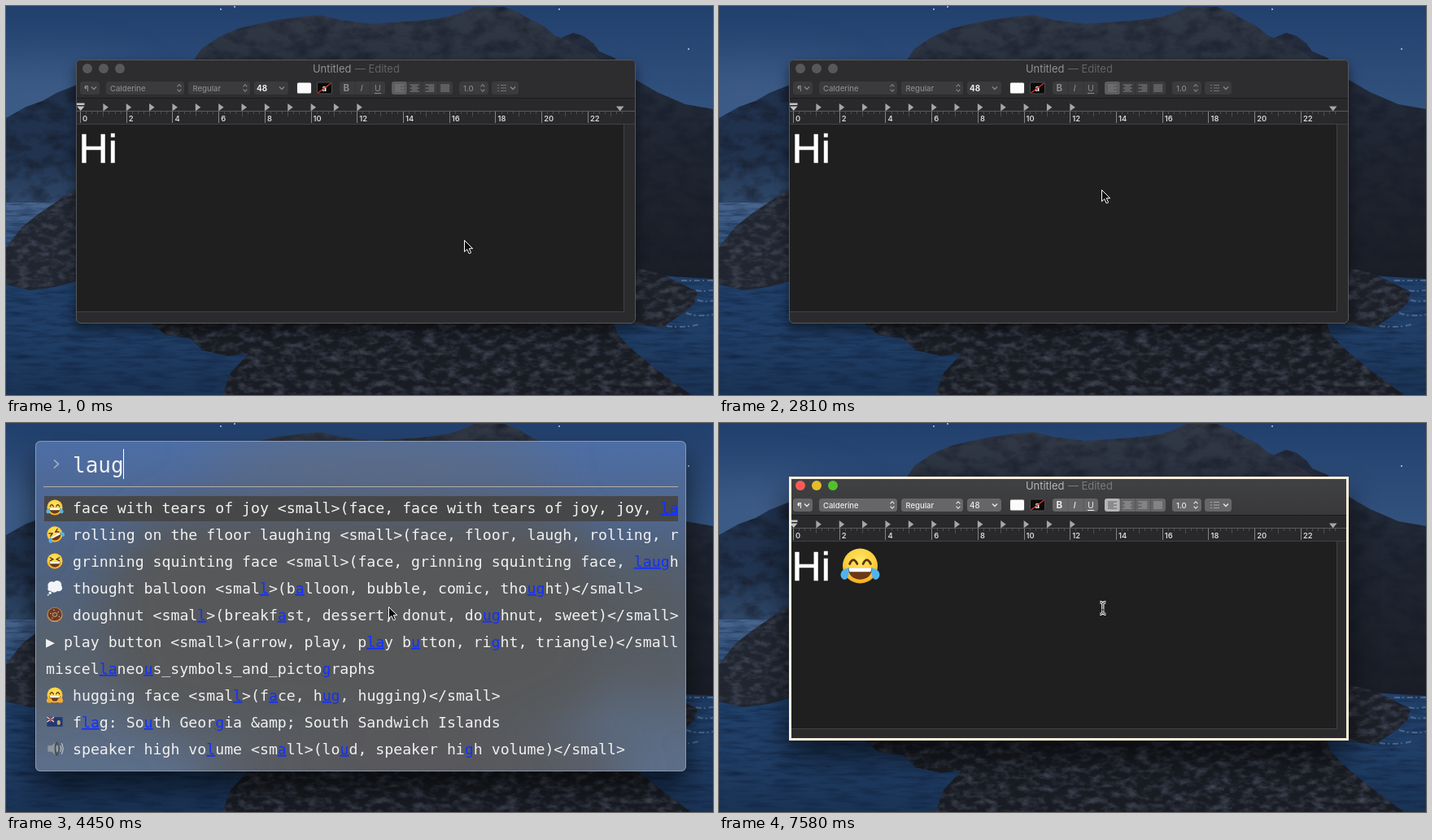
These frames come from a looping animation (869 px wide and 479 px high, 8 s). An HTML page:

```html
<!DOCTYPE html>
<html lang="en">
<head>
<meta charset="utf-8">
<title>Emoji picker</title>
<style>
  html, body { margin: 0; width: 100%; height: 100%; overflow: hidden; background: #1d355e; }
  svg { display: block; width: 869px; height: 479px; }
  text { font-family: Inter, Roboto, sans-serif; }
  .mono { font-family: "DejaVu Sans Mono", monospace; }
  .doc { font-family: "Liberation Sans", sans-serif; }
  .hit { fill: #1230ff; text-decoration: underline; }
</style>
</head>
<body>
<svg id="stage" viewBox="0 0 869 479" xmlns="http://www.w3.org/2000/svg"></svg>
<script>
const LOOP = 8000;
const stage = document.getElementById('stage');

// ---- small builders
const esc = s => s.replace(/&/g, '&amp;').replace(/</g, '&lt;');
const rect = (x, y, w, h, fill, more = '') =>
  `<rect x="${x}" y="${y}" width="${w}" height="${h}" fill="${fill}" ${more}/>`;
const path = (d, fill, more = '') => `<path d="${d}" fill="${fill}" ${more}/>`;
const line = (d, color, w = 1, more = '') =>
  `<path d="${d}" fill="none" stroke="${color}" stroke-width="${w}" ${more}/>`;
const oval = (x, y, rx, ry, fill, more = '') =>
  `<ellipse cx="${x}" cy="${y}" rx="${rx}" ry="${ry}" fill="${fill}" ${more}/>`;
const label = (x, y, s, size, fill, more = '') =>
  `<text x="${x}" y="${y}" font-size="${size}" fill="${fill}" ${more}>${esc(s)}</text>`;
const group = (body, more = '') => `<g ${more}>${body}</g>`;
const gradient = (id, stops) =>
  `<linearGradient id="${id}" x1="0" y1="0" x2="0" y2="1">` +
  stops.map(([o, c]) => `<stop offset="${o}" stop-color="${c}"/>`).join('') + '</linearGradient>';
const blur = (id, d) =>
  `<filter id="${id}" x="-50%" y="-80%" width="200%" height="260%"><feGaussianBlur stdDeviation="${d}"/></filter>`;
const grain = (id, freq, seed, rgb, gain, shift) =>
  `<filter id="${id}" x="0" y="0" width="1" height="1" color-interpolation-filters="sRGB">
    <feTurbulence type="fractalNoise" baseFrequency="${freq}" numOctaves="4" seed="${seed}"/>
    <feColorMatrix values="0 0 0 0 ${rgb[0]} 0 0 0 0 ${rgb[1]} 0 0 0 0 ${rgb[2]} ${gain} 0 0 0 ${shift}"/>
    <feComposite operator="in" in2="SourceAlpha" result="g"/>
    <feMerge><feMergeNode in="SourceGraphic"/><feMergeNode in="g"/></feMerge></filter>`;

const defs = `<defs>
  ${gradient('sky', [[0, '#22406d'], [.5, '#33537f'], [1, '#45638d']])}
  ${gradient('sea', [[0, '#4a678f'], [.2, '#35557f'], [.45, '#20406a'], [.7, '#203e66'], [1, '#1a3355']])}
  ${gradient('peak', [[0, '#333a47'], [1, '#232a38']])}
  ${gradient('hill', [[0, '#20314c'], [.6, '#20334f'], [1, '#2f4869']])}
  ${gradient('cliff', [[0, '#262f40'], [.5, '#1f2531'], [1, '#1b1e26']])}
  ${gradient('bar', [[0, '#414244'], [1, '#38383a']])}
  ${gradient('panel', [[0, '#4c6ea6'], [.14, '#4f6996'], [.4, '#4f627f'], [.7, '#596371'], [1, '#5c6f8b']])}
  <radialGradient id="skin" cy=".35" r=".7"><stop offset="0" stop-color="#ffe866"/>
    <stop offset=".6" stop-color="#fdcf3c"/><stop offset="1" stop-color="#f3a01f"/></radialGradient>
  ${blur('soft', 8)}${blur('wide', 18)}${blur('haze', 28)}
  ${grain('rock', '.07 .13', 4, [.31, .34, .41], 1.5, -.62)}
  ${grain('slope', '.04 .07', 9, [.09, .11, .16], 1.6, -.65)}
  ${grain('wave', '.03 .2', 6, [.07, .14, .25], 1.5, -.62)}
  <clipPath id="inside"><rect x="36" y="22" width="800" height="407" rx="6"/></clipPath>
  <clipPath id="rows"><rect x="46" y="85" width="780" height="340"/></clipPath>
</defs>`;

// ---- wallpaper
const wallpaper =
  rect(0, 0, 869, 260, 'url(#sky)') +
  oval(40, 110, 130, 40, '#46658f', 'filter="url(#haze)" opacity=".6"') +
  [[264, 4], [281, 1], [680, 4], [839, 53]].map(([x, y]) => oval(x, y, 1, 1, '#b9cdea')).join('') +
  rect(0, 238, 869, 241, 'url(#sea)', 'filter="url(#wave)"') +
  path('M0 138L25 124 45 117 62 107 90 96V242H0z', 'url(#hill)', 'filter="url(#slope)"') +
  path('M670 50L685 38 697 33 710 37 722 46 729 56 748 64 773 90 800 106 835 121 869 127V336L770 330z', 'url(#cliff)', 'filter="url(#slope)"') +
  path('M230 68L240 53 262 38 285 28 310 22 335 17 365 13 386 11 410 17 450 22 480 20 520 17 545 13 560 8 576 1H612L630 8 645 17 660 24 674 36 692 43 720 58 735 70V140H230z', 'url(#peak)', 'filter="url(#slope)"') +
  path('M0 297L20 272 40 256 62 241 90 223V338L60 346 30 350 0 343z', '#20252f', 'filter="url(#rock)"') +
  path('M770 322L800 328 822 338 850 352 846 366 830 380 806 396 770 392z', '#1d2028', 'filter="url(#rock)"') +
  line('M830 338h39M848 350q6 2 21 0M850 362q8 3 19 1M836 378q14 5 33 2M812 394q20 3 40-2', '#8099b8', 2, 'opacity=".45" stroke-dasharray="7 3 2 4"') +
  path('M172 385H745L752 405 772 425 800 448 842 479H266L276 452 298 428 272 431 242 424 226 409 196 405z', '#191c23', 'filter="url(#rock)"');

// ---- emoji, drawn around 0,0 with radius 10
const INK = '#5a3210';
const EYES = {
  dot: oval(-3.5, -2.6, 1.4, 2.2, INK) + oval(3.5, -2.6, 1.4, 2.2, INK),
  arc: line('M-6-1.2q2.1-4.4 4.3 0M1.7-1.2q2.1-4.4 4.3 0', INK, 1.3, 'stroke-linecap="round"'),
  squint: line('M-6-4.4l3.8 2-3.8 2M6-4.4l-3.8 2 3.8 2', INK, 1.4, 'stroke-linecap="round"')
};
const MOUTHS = {
  open: path('M-7 1H7C6.8 10-6.8 10-7 1z', '#6a3a14') + path('M-6.6 1H6.6L6 3.4H-6z', '#fff'),
  teeth: path('M-7 1H7C6.8 9.5-6.8 9.5-7 1z', '#fff', `stroke="${INK}" stroke-width=".8"`) + line('M-6.2 4H6.2M-2.5 1V7M2.5 1V7', '#b9a98c', .6),
  smile: line('M-5.2 3.2q5.2 5 10.4 0', INK, 1.4, 'stroke-linecap="round"')
};
const drops = path('M-6.6 1.2C-11 1.6-12.4 5.6-10 7.4-7.4 9.2-6 5.2-6.6 1.2zM6.6 1.2C11 1.6 12.4 5.6 10 7.4 7.4 9.2 6 5.2 6.6 1.2z', '#4fb4ee');
const face = (eyes, mouth, extra = '', turn = 0) =>
  group(oval(0, 0, 10, 10, 'url(#skin)') + EYES[eyes] + MOUTHS[mouth] + extra, `transform="rotate(${turn})"`);

const EMOJI = {
  grin: face('dot', 'open'),
  eyes: face('dot', 'open'),
  smiling: face('arc', 'open'),
  beam: face('arc', 'teeth'),
  squint: face('squint', 'open'),
  sweat: face('arc', 'open', path('M6-10C9-7 9.8-4 7.4-3.4 4.8-3.2 4.6-6.4 6-10z', '#4fb4ee')),
  rofl: face('squint', 'open', drops, -28),
  joy: face('arc', 'open', drops),
  slight: face('dot', 'smile'),
  flipped: face('dot', 'smile', '', 180),
  hug: face('arc', 'open', oval(-7, 7, 3.6, 3, '#f5ad2b') + oval(7, 7, 3.6, 3, '#f5ad2b')),
  thought: [[-4, -3, 5], [3, -4, 5.5], [5, 0, 4.5], [-1, 1, 5], [-6, 1, 3], [-6, 6.5, 1.8], [-8.5, 9, 1]]
    .map(([x, y, r]) => oval(x, y, r, r, '#f1f5fa')).join(''),
  donut: oval(0, 0, 10, 9.5, '#c98d4f') + oval(0, -.5, 8.8, 8, '#6b3a25') + oval(0, 0, 3, 2.6, '#55504c', 'stroke="#d9a061"') +
    line('M-6-2l1.5 1M5-4l-1 1.4M-2-6l1.6.4M5 3l1.2-1M-4 4l1.4.6', '#f3a8c0', 1.1),
  flag: rect(-10, -6, 20, 12, '#20396f') + line('M-10-6L-1 0M-1-6L-10 0', '#e8e8ee', 1.2) + line('M-5.5-6V0M-10-3H-1', '#d03a45', 1.3) + oval(5, 1, 2.2, 3, '#b9a86c'),
  speaker: path('M-9-4H-4L3-10V10L-4 4H-9z', '#8f979f') + oval(2.5, 0, 3, 9.5, '#4a5158') + oval(3, 0, 1.4, 4.6, '#99a2aa') +
    line('M7-4q2.4 4 0 8M8.6-7q4 7 0 14', '#c9d0d6', 1.1)
};
const emoji = (name, x, y, r) => group(EMOJI[name], `transform="translate(${x} ${y}) scale(${r / 10})"`);

// ---- editor window
function editor(on) {
  const fill = on ? '#666668' : '#3b3b3e';
  const ink = on ? '#ececec' : '#88888b';
  const field = (x, w) => rect(x, 93, w, 16, fill, 'rx="3.5"');
  const down = x => line(`M${x - 3} 99.5l3 3 3-3`, ink, 1.3);
  const updown = x => line(`M${x - 2.4} 99.3l2.4-2.6 2.4 2.6M${x - 2.4} 102.7l2.4 2.6 2.4-2.6`, ink, 1.1);
  const word = (x, s, more = '') => label(x, 104.6, s, 9.5, ink, more || 'font-weight="500"');

  let s = rect(86, 66, 688, 325, '#000', on
    ? 'rx="6" transform="translate(0 20)" filter="url(#wide)" opacity=".6"'
    : 'rx="6" transform="translate(0 8)" filter="url(#soft)" opacity=".5"');
  s += rect(86.5, 66.5, 687, 324, '#2b2b2d', 'rx="5.5" stroke="#56575a"');
  s += path('M87 114V72q0-5 5-5H768q5 0 5 5V114z', on ? 'url(#bar)' : '#2d2d2f');
  s += ['#fc5b57', '#e5bd2b', '#52c22c'].map((c, i) => oval(100 + 20 * i, 77, 6, 6, on ? c : '#58585a')).join('');
  s += label(377, 82, 'Untitled', 12.9, on ? '#b6b6b7' : '#929295');
  s += label(429, 82, '— Edited', 12.9, on ? '#7b7b7d' : '#636366');

  s += field(91, 24) + word(96, '¶', 'font-weight="600"') + down(108);
  s += field(123, 96) + word(128, 'Calderine') + updown(213);
  s += field(224, 76) + word(229.5, 'Regular') + updown(294);
  s += field(305, 42) + label(308, 104.6, '48', 9.8, on ? ink : '#f0f0f0', on ? 'font-weight="500"' : 'font-weight="700"') + down(339);
  s += rect(357, 93.5, 19, 15, on ? '#4a4a4c' : '#3a3a3c', 'rx="2"') + rect(358, 94.5, 17, 13, '#fbfbfb', 'rx="1.5"');
  s += rect(382.5, 94, 18, 14, '#0a0a0a', 'rx="2" stroke="#4c4c4e"') + label(388.2, 104.5, 'a', 10, '#fff', 'font-weight="700"') + line('M383.5 107L399.5 95', '#e0362c', 1.3);
  s += field(410, 56);
  s += label(414.5, 105, 'B', 11.5, ink, 'font-weight="700"') + label(435.5, 105, 'I', 11.5, ink, 'class="doc" font-style="italic"') + label(453, 104.5, 'U', 10.5, ink) + line('M453 107.5h8', ink);
  s += field(474, 75) + rect(474, 93, 19, 16, on ? '#b4b4b5' : '#5d5d60', 'rx="3"');
  for (let i = 0; i < 4; i++) {
    const x = 478 + 18.7 * i;
    for (let k = 0; k < 5; k++) {
      const w = i < 3 && k % 2 ? 7 : 11;
      s += rect(x + [0, (11 - w) / 2, 11 - w, 0][i], 96.5 + 2 * k, w, 1.2, on ? (i ? '#98989a' : '#717173') : '#77777a');
    }
    if (i) s += line(`M${x - 3.5} 93v16`, on ? '#555557' : '#333335');
  }
  s += line('M429 93v16M448 93v16', on ? '#5b5b5d' : '#343436');
  s += field(557, 36) + word(562, '1.0') + updown(586);
  s += field(597, 33) + line('M604 97.5h2M608 97.5h7M604 101h2M608 101h7M604 104.5h2M608 104.5h7', on ? '#a5a5a7' : '#77777a') + down(623);

  // ruler
  s += rect(87, 113, 686, 33, '#29292b') + line('M87 113.5H773', '#1b1b1c') + line('M87 129.5H773', '#59595b');
  const unit = 28.36;
  for (let q = 0; q <= 94; q++) {
    const x = Math.round(91 + q * unit / 4) + .5;
    s += line(`M${x} 130v${q % 8 === 0 ? 14 : q % 4 === 0 ? 6 : 3}`, q % 8 ? '#4e4e50' : '#848486');
  }
  for (let i = 0; i <= 22; i += 2) s += label(94 + i * unit, 142.3, String(i), 9.3, '#d8d8d9', 'font-weight="600"');
  for (let i = 1; i <= 12; i++) s += path(`M${91 + i * unit} 120v9.5l6.5-4.8z`, '#a6a6a8');
  s += path('M87 119.5h9.5v2.5H87zM87 123.5h9.5l-4.8 5.5z', '#c4c4c6') + path('M750 123.5h9.5l-4.8 6z', '#a6a6a8');

  // page
  s += rect(87, 146, 672, 230, '#1e1f1e') + line('M87 145.5H773M759.5 146V376.5H87', '#414143');
  if (on) s += rect(87.5, 67.5, 685, 322, 'none', 'stroke="#fdf2dd" stroke-width="3"');
  return s;
}

// ---- picker lists: [emoji, text], matches in brackets
const ALL = [
  ['grin', 'grinning face <small>(face, grin, grinning face)</small>'],
  ['eyes', 'grinning face with big eyes <small>(face, grinning face with big eyes'],
  ['smiling', 'grinning face with smiling eyes <small>(eye, face, grinning face with'],
  ['beam', 'beaming face with smiling eyes <small>(beaming face with smiling eyes'],
  ['squint', 'grinning squinting face <small>(face, grinning squinting face, laugh'],
  ['sweat', 'grinning face with sweat <small>(cold, face, grinning face with sweat'],
  ['rofl', 'rolling on the floor laughing <small>(face, floor, laugh, rolling, ro'],
  ['joy', 'face with tears of joy <small>(face, face with tears of joy, joy, laugh'],
  ['slight', 'slightly smiling face <small>(face, slightly smiling face, smile)</small>'],
  ['flipped', 'upside–down face <small>(face, upside–down)</small>']
];
const BLOCKS = '[l]ao [l]isu [l]imbu ad[l]am tami[l] [l]epcha [l]ycian te[l]ugu [l]ydian tai_[l]e'
  .split(' ').map(s => ['', s]);
const LAUGH = [
  ['joy', 'face with tears of joy <small>(face, face with tears of joy, joy, [laugh]'],
  ['rofl', 'rolling on the floor laughing <small>(face, floor, laugh, rolling, ro'],
  ['squint', 'grinning squinting face <small>(face, grinning squinting face, [laugh]'],
  ['thought', 'thought balloon <smal[l]>(b[a]lloon, bubble, comic, tho[ugh]t)</small>'],
  ['donut', 'doughnut <smal[l]>(breakf[a]st, dessert, donut, do[ugh]nut, sweet)</small>'],
  ['', '▶ play button <small>(arrow, play, p[la]y b[u]tton, ri[gh]t, triangle)</small>'],
  ['', 'miscel[la]neo[u]s_symbols_and_picto[g]rap[h]s'],
  ['hug', 'hugging face <smal[l]>(f[a]ce, h[ug], [h]ugging)</small>'],
  ['flag', 'f[la]g: So[u]th Geor[g]ia &amp; South Sandwic[h] Islands'],
  ['speaker', 'speaker high vo[l]ume <sm[a]ll>(lo[u]d, speaker hi[gh] volume)</small>']
];

// marks only the first n matched letters
function marked(text, n) {
  return text.split(/[\[\]]/).map((part, i) => {
    if (i % 2 === 0) return esc(part);
    const hit = part.slice(0, n);
    n -= hit.length;
    return (hit && `<tspan class="hit">${hit}</tspan>`) + esc(part.slice(hit.length));
  }).join('');
}
function list(query) {
  const items = !query ? ALL : query === 'l' ? BLOCKS : LAUGH;
  return items.map(([icon, text], i) => {
    const y = 104 + 33 * i;
    return (icon && emoji(icon, 60, y, 9.6)) +
      `<text class="mono" x="${icon ? 82 : 49}" y="${y + 6.8}" font-size="18.2" fill="#f0f0f0">${marked(text, query.length)}</text>`;
  }).join('');
}

const picker =
  rect(36, 22, 800, 407, '#000', 'rx="6" transform="translate(0 20)" filter="url(#wide)" opacity=".6"') +
  group(rect(36, 22, 800, 407, 'url(#panel)') +
    group(oval(460, 48, 220, 22, '#606a7b') + rect(120, 105, 630, 275, '#57585a', 'rx="120"') +
      oval(500, 430, 270, 50, '#58595b') + oval(800, 245, 50, 90, '#575b62') + oval(60, 290, 30, 50, '#596068'), 'filter="url(#haze)"'),
    'clip-path="url(#inside)"') +
  rect(36.5, 22.5, 799, 406, 'none', 'rx="6" stroke="#8b98ac"') +
  line('M59 45.5l5.5 5-5.5 5', '#aab6ca', 1.5) +
  line('M46 78.5H826', '#b5aea4') +
  rect(47, 90, 779, 31, '#464749') +
  `<text id="query" class="mono" x="82" y="61" font-size="26" fill="#f0f0f0"></text>` +
  group('', 'id="list" clip-path="url(#rows)"');

const arrow = path('M.5.5V14.6l3.3-3 2.4 5.3 2.4-1.1-2.3-5.1h4.4z', '#0a0a0a', 'stroke="#fff" stroke-width="1"');
const beamPath = 'M1.2 1.6q3 0 3.6 2 .6-2 3.6-2M4.8 3.5V14.5M1.2 16.4q3 0 3.6-2 .6 2 3.6 2M3.2 11h3.2';
const beam = line(beamPath, '#fff', 3.2) + line(beamPath, '#0a0a0a', 1);

stage.innerHTML = defs + wallpaper +
  group(editor(false), 'id="idle"') + group(editor(true), 'id="active"') +
  group(label(89.6, 193, 'Hi', 50, '#fff', 'class="doc" stroke="#fff" stroke-width=".5"'), 'id="hello"') +
  group(emoji('joy', 173.5, 176, 21.5), 'id="reply"') +
  group(picker, 'id="picker"') +
  rect(0, 0, 1, 58, '#fff', 'id="caret"') +
  group(arrow, 'id="arrow"') + group(beam, 'id="beam"');

const $ = id => document.getElementById(id);
const show = (id, on) => $(id).setAttribute('display', on ? 'inline' : 'none');
const at = (steps, t) => steps.filter(s => s[0] <= t).pop();

// time, then values that hold until the next step
const POINTER = [[0, 'arrow', 563, 288], [750, 'arrow', 551, 283], [900, 'arrow', 505, 250],
  [1030, 'beam', 466, 219], [1320, 'beam', 467, 219], [2660, 'arrow', 470, 226], [5790, 'beam', 467, 219]];
const QUERY = [[0, ''], [4160, 'l'], [4310, 'la'], [4450, 'laug'], [4600, 'laugh']];
const CARET = [[0], [1170, 149, 146, 58], [1620], [2220, 149, 146, 58], [2810],
  [2960, 82, 32, 37], [3560], [4010, 82, 32, 37], [4160, 97, 32, 37], [4310, 113, 32, 37],
  [4450, 144, 32, 37], [4600, 160, 32, 37], [5200], [5640, 160, 32, 37],
  [5790, 149, 146, 58], [6080, 197, 146, 63], [6680], [6980, 91, 209, 58], [7580]];

let shown = null;
function draw(t) {
  const picking = t >= 2960 && t < 5790;
  const active = (t >= 1170 && t < 2810) || t >= 5790;
  show('picker', picking);
  show('active', active);
  show('idle', !active && !picking);
  show('hello', !picking);
  show('reply', t >= 6080);
  $('hello').setAttribute('transform', `translate(0 ${t >= 6080 ? 1 : 0})`);

  const [, kind, px, py] = at(POINTER, t);
  show('arrow', kind === 'arrow');
  show('beam', kind === 'beam');
  $(kind).setAttribute('transform', `translate(${px} ${py})`);

  const [, cx, cy, ch] = at(CARET, t);
  show('caret', cx);
  if (cx) {
    $('caret').setAttribute('x', cx);
    $('caret').setAttribute('y', cy);
    $('caret').setAttribute('height', ch);
  }

  const query = at(QUERY, t)[1];
  if (query !== shown) {
    shown = query;
    $('query').textContent = query;
    $('list').innerHTML = list(query);
  }
}

const start = performance.now();
function tick() {
  draw((performance.now() - start) % LOOP);
  requestAnimationFrame(tick);
}
draw(0);
requestAnimationFrame(tick);
</script>
</body>
</html>
```
